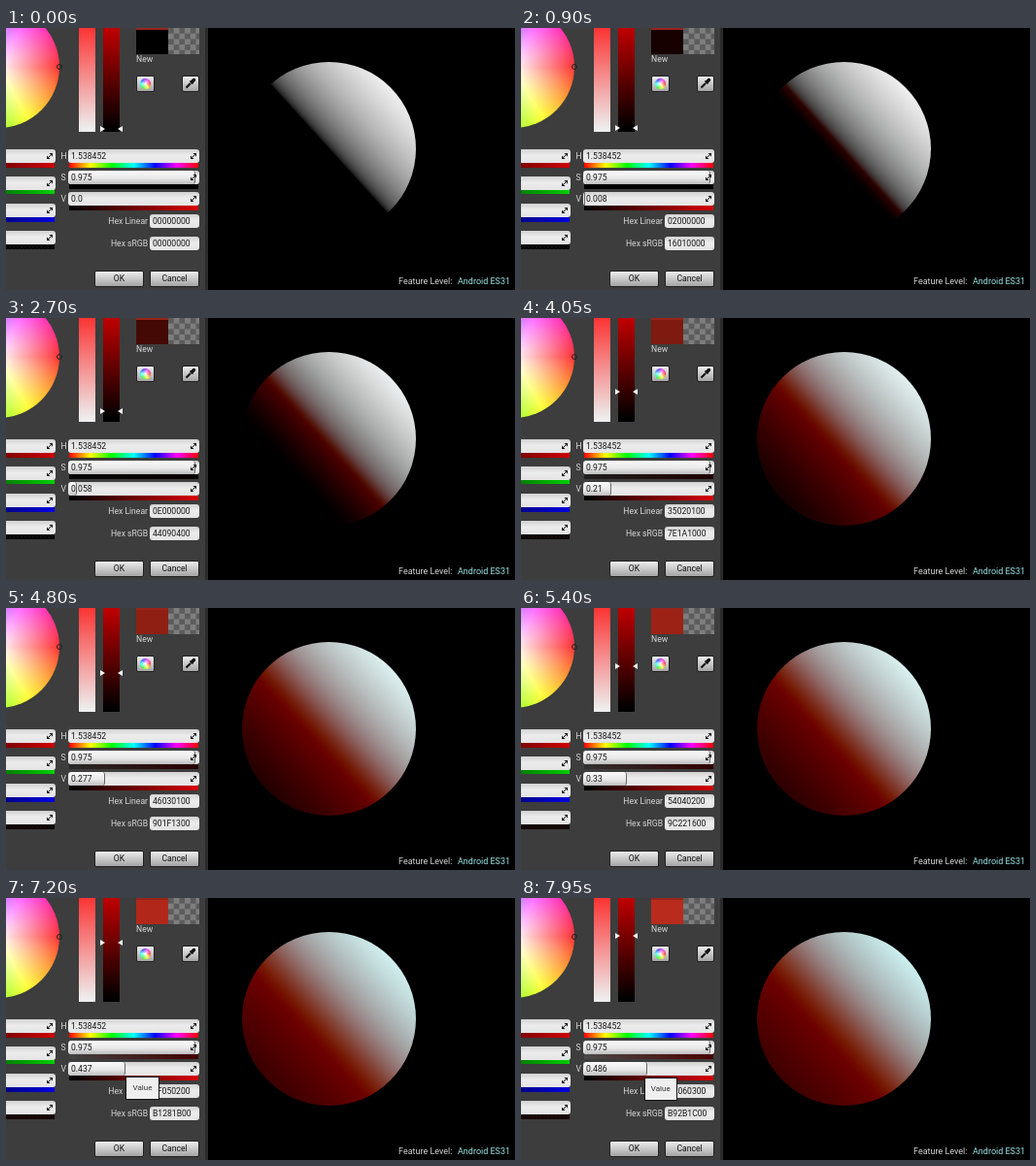
Write an HTML page that moves like this. It is 524x270 px and loops after 8000 ms.

```html
<!DOCTYPE html>
<html lang="en">
<head>
<meta charset="utf-8">
<title>Subsurface colour picker</title>
<style>
  html, body { margin: 0; width: 100%; height: 100%; overflow: hidden; background: #000; }
  body { position: relative; font: 8.6px Roboto, sans-serif; color: #d6d6d6; }
  div { position: absolute; box-sizing: border-box; white-space: pre; }
  svg { position: absolute; overflow: visible; }
  .field { background: linear-gradient(#d2d2d2, #ececec 45%, #e4e4e4); border-radius: 3px; color: #111; padding-left: 3px; overflow: hidden; }
  .fill { background: linear-gradient(#fafafa, #e9e9e9 55%, #bdbdbd); border-right: 1px solid #666; border-radius: 3px; }
  .button { background: linear-gradient(#ededed, #c9c9c9 50%, #a4a4a4); border: 1px solid #222; border-radius: 2px; color: #111; text-align: center; }
  .right { text-align: right; }
  .tip { background: #f0eff0; border: 1.5px solid #111; color: #333; font-size: 8px; text-align: center; }
</style>
</head>
<body>
<script>
const LOOP = 8000, STEP = 150;
const HUE = 1.538452 / 360, SATURATION = 0.975;
const RADIUS = 89.5, LIGHT_ANGLE = 47.8;
const HUES = '#f00, #ff0, #0f0, #0ff, #00f, #f0f, #f00';

// [time, brightness]; flat stretches are pauses in the drag
const DRAG = [
  [0, 0], [450, 0], [900, .008], [1050, .008], [1500, .018], [1650, .018],
  [1800, .021], [2700, .058], [3000, .08], [3300, .08], [4050, .21],
  [4350, .25], [4500, .25], [5400, .33], [5700, .33], [6300, .387],
  [6600, .405], [6750, .405], [7800, .48], [7950, .486]
];

function box(x, y, w, h, { css = '', cls = '', text = '', parent = document.body } = {}) {
  const el = document.createElement('div');
  el.className = cls;
  el.style.cssText = `left:${x}px;top:${y}px;width:${w}px;height:${h}px;line-height:${h}px;${css}`;
  el.textContent = text;
  parent.append(el);
  return el;
}

function icon(x, y, markup) {
  document.body.insertAdjacentHTML('beforeend',
    `<svg width="8" height="8" style="left:${x}px;top:${y}px">${markup}</svg>`);
}

const label = (x, center, text, css) => box(x, center - 6, 60, 12, { text, css });
const strip = (x, y, w, background) => box(x, y, w, 5, { css: `background:${background}` });
const checker = (a, b, size) =>
  `repeating-conic-gradient(${a} 0 25%, ${b} 0 50%) 0 0/${size}px ${size}px`;
const wheel = (x, y, size) => box(x, y, size, size, {
  css: `border-radius:50%;background:radial-gradient(closest-side, #fff, #fff9 50%, #fff3),conic-gradient(from 90deg, ${HUES})`
});

function spinBox(x, y, background) {
  const line = strip(x + 1, y + 13.5, 133, background);
  const field = box(x, y, 135, 14, { cls: 'field' });
  const fill = box(1, 0, 0, 14, { cls: 'fill', parent: field });
  const text = box(3, 0, 60, 14, { parent: field });
  icon(x + 126, y + 4, '<path d="M2.5 0H6V3.5ZM0 2.5V6H3.5Z" fill="#111"/><path d="M1.5 4.5l3-3" stroke="#111"/>');
  return { line, fill, text };
}

// Panel and colour wheel
box(0, 0, 208, 270, { css: 'background:#3c3d3c;border-right:3px solid #2a2b2a' });
wheel(-71, -23, 126);
box(51.5, 36.5, 6, 6, { css: 'border:1.2px solid #222;border-radius:50%' });

// Vertical saturation and brightness bars
box(75, -29, 16.5, 136, { css: 'background:linear-gradient(#f00, #eee 98%)' });
box(100, -29, 17, 136, { css: 'background:linear-gradient(#f50000, #000 98%)' });
const arrows = box(97, 0, 23, 6);
arrows.innerHTML = '<svg width="23" height="6"><path d="M0 0L5 3L0 6ZM23 0L18 3L23 6Z" fill="#f4f4f4"/></svg>';

// Swatches
const swatch = box(134, 0, 32.5, 27);
box(134, 0, 32.5, 1.5, { css: 'background:#98241a' });
box(166.5, 0, 32, 27, { css: `background:${checker('#7e7e7e', '#5c5c5c', 11.4)}` });
label(134, 32, 'New');

// Tool buttons
box(134, 48.5, 19, 17, { cls: 'button' });
wheel(138, 51.5, 11);
box(181, 48.5, 18, 17, { cls: 'button' });
icon(185, 52, '<path d="M.5 9.5L5 5" stroke="#111" stroke-width="2.2"/><path d="M4.500 2.500L7.500 5.500" stroke="#111" stroke-width="1.500"/><path d="M6.500 3.500L8.500 1.500" stroke="#111" stroke-width="3.400" stroke-linecap="round"/>');

// Channel fields
spinBox(-84, 125, 'linear-gradient(90deg, #000, #d00000)');
spinBox(-84, 152.5, 'linear-gradient(90deg, #000, #00d000)');
spinBox(-84, 181, 'linear-gradient(90deg, #000, #0000e0)');
const alpha = spinBox(-84, 209, '#000');
const hue = spinBox(64, 125, `linear-gradient(90deg, ${HUES})`);
const saturation = spinBox(64, 147, '#000');
const value = spinBox(64, 169, 'linear-gradient(90deg, #000, #d80000)');
[['H', 132], ['S', 154], ['V', 176]].forEach(([name, y]) => label(56.5, y, name));
hue.text.textContent = '1.538452';
hue.fill.style.display = 'none';
saturation.text.textContent = SATURATION;
saturation.fill.style.width = '130px';

function hexField(center, name) {
  box(80, center - 7, 66, 14, { cls: 'right', text: name });
  return box(148, center - 7, 51, 14, { cls: 'field' });
}
const hexLinear = hexField(199, 'Hex Linear');
const hexSrgb = hexField(221.5, 'Hex sRGB');

box(91, 249.5, 51, 17, { cls: 'button', text: 'OK', css: 'line-height:15px' });
box(148, 249.5, 51, 17, { cls: 'button', text: 'Cancel', css: 'line-height:15px' });

// Viewport
const sphere = box(332.4 - RADIUS, 124.3 - RADIUS, 2 * RADIUS, 2 * RADIUS, { css: 'border-radius:50%' });
label(404, 261, 'Feature Level:', 'font-size:9px');
label(465, 261, 'Android ES31', 'font-size:9px;color:#9be6e6');

const tip = box(0, 0, 34.5, 24, { cls: 'tip', text: 'Value', css: 'line-height:21px' });

function dragValue(t) {
  const next = DRAG.findIndex(([time]) => time > t);
  if (next < 0) return DRAG.at(-1)[1];
  const [t0, v0] = DRAG[next - 1], [t1, v1] = DRAG[next];
  return v0 + (v1 - v0) * (t - t0) / (t1 - t0);
}

const toSrgb = c => c <= .0031308 ? 12.92 * c : 1.055 * c ** (1 / 2.4) - .055;
const toByte = c => Math.floor(Math.min(c, 1) * 255.999);
const css = rgb => `rgb(${rgb.map(toByte)})`;
const hex = rgb => [...rgb, 0].map(c => toByte(c).toString(16).padStart(2, '0')).join('').toUpperCase();

function linearColor(v) {
  const low = 1 - SATURATION;
  return [v, v * (low + SATURATION * HUE * 6), v * low];
}

// Diffuse light whose terminator is blurred according to the scatter colour
function scatter(d, amount) {
  const width = 3.8 * amount ** .6;
  const spill = Math.max(0, width - Math.abs(d)) ** 3 / (6 * width * width || 1);
  const light = Math.max(0, d) + spill;
  return toSrgb(.87 * light * (1 - .06 * width * width));
}

function sphereGradient(color) {
  const angle = LIGHT_ANGLE * Math.PI / 180;
  const middle = RADIUS * (Math.sin(angle) + Math.cos(angle));
  const stops = [];
  for (let i = -24; i <= 24; i++) {
    const d = i * Math.abs(i) / 576;
    stops.push(`${css(color.map(c => scatter(d, c)))} ${(middle + d * RADIUS).toFixed(2)}px`);
  }
  return `linear-gradient(${LIGHT_ANGLE}deg, ${stops})`;
}

function placeTip(t, v) {
  const early = t >= 1800 && t < 2400, late = t >= 5850;
  const progress = (v - .387) / (.486 - .387);
  tip.style.opacity = !early && !late ? 0 : t === 1800 || t === 5850 ? .45 : 1;
  tip.style.left = (early ? 95 : 120 + 6.5 * progress) + 'px';
  tip.style.top = (early ? 181 : 184 + .5 * progress) + 'px';
}

function draw(t) {
  const v = dragValue(t);
  const color = linearColor(v), srgb = color.map(toSrgb);
  const paint = css(srgb);

  sphere.style.background = sphereGradient(color);
  swatch.style.background = paint;
  arrows.style.top = 101 - v * 133 + 'px';

  const rounded = Math.round(v * 1000) / 1000;
  value.text.textContent = rounded || '0.0';
  value.fill.style.display = v ? 'block' : 'none';
  value.fill.style.width = v * 133 + 'px';
  const dim = .6 * v;
  saturation.line.style.background = `linear-gradient(90deg, ${css([dim, dim, dim])}, ${css([dim, 0, 0])})`;
  alpha.line.style.background = checker(css([dim / 2, 0, 0]), '#0c0c0c', 4);

  hexLinear.textContent = hex(color);
  hexSrgb.textContent = hex(srgb);
  placeTip(t, v);
}

function tick(now) {
  draw(Math.floor(now % LOOP / STEP) * STEP);
  requestAnimationFrame(tick);
}
tick(0);
</script>
</body>
</html>
```
